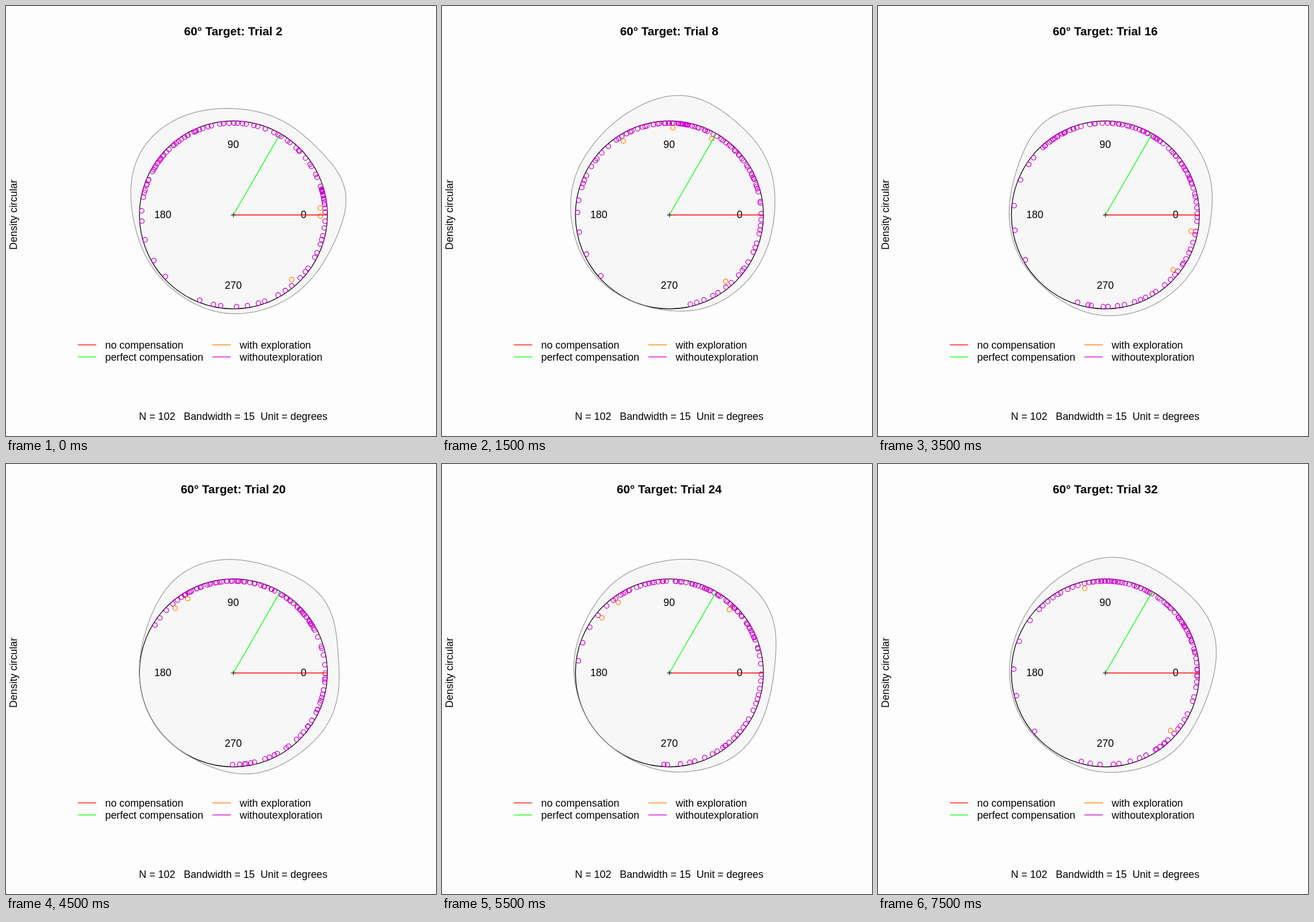
These frames come from a looping animation (748x748 px, 8 s). An HTML page:

```html
<!DOCTYPE html>
<html lang="en">
<head>
<meta charset="utf-8">
<title>Circular density by trial</title>
<style>
  html, body { margin: 0; width: 100%; height: 100%; overflow: hidden; background: #fdfdfd; }
  svg { display: block; width: 100vw; height: 100vh; }
  text { font: 17.85px "Liberation Sans", Arial, sans-serif; fill: #000; white-space: pre; }
  .mid { text-anchor: middle; }
  #title { font-size: 20.7px; font-weight: bold; }
  path, circle { fill: none; stroke-width: 1.3; }
  #area { fill: #f7f7f7; }
  #edge { stroke: #a0a0a0; }
  .rim { stroke: #000; }
  .none { stroke: #f00; }
  .perfect { stroke: #0f0; }
  .with { stroke: #ff7f00; }
  .without { stroke: #cd00cd; }
</style>
</head>
<body>
<svg viewBox="0 0 748 748">
  <text id="title" class="mid" x="395.3" y="50.5"></text>
  <path id="area"/>
  <circle class="rim" cx="395.6" cy="363.3" r="163.5"/>
  <path id="edge"/>
  <text class="mid" x="395.3" y="246.7">90</text>
  <text class="mid" x="272.8" y="369.3">180</text>
  <text class="mid" x="395.3" y="491.8">270</text>
  <text class="mid" x="517.8" y="369.3">0</text>
  <path id="without" class="without"/>
  <path id="with" class="with"/>
  <path class="none" d="M395.5 363.5H559"/>
  <path class="perfect" d="M395.6 363.3L477.2 221.9"/>
  <path stroke="#333" d="M391.5 363.5h8M395.5 359.5v8"/>

  <path class="none" d="M125 589.5h32"/>
  <path class="perfect" d="M125 610.5h32"/>
  <path class="with" d="M359 589.5h32"/>
  <path class="without" d="M359 610.5h32"/>
  <text x="172.5" y="595.7">no compensation</text>
  <text x="172.5" y="617">perfect compensation</text>
  <text x="406.5" y="595.7">with exploration</text>
  <text x="406.5" y="617">withoutexploration</text>

  <text class="mid" x="395.3" y="720.3">N = 102   Bandwidth = 15  Unit = degrees</text>
  <text class="mid" transform="translate(19 363) rotate(-90)">Density circular</text>
</svg>
<script>
const CX = 395.6, CY = 363.3, R = 163.5, RAD = Math.PI / 180;
const N = 102, KAPPA = 15, SCALE = 0.67;
const STEP = 500, STEPS = 16;

// Key trials: evenly ranked quantiles of the angles in degrees,
// and the few angles reached with exploration.
const keys = {
  2: { many: [-111, -60, -21, 6, 14, 16.5, 44, 64, 86, 109, 122, 137.5, 147.5, 164.5, 224], few: [4.5, -0.8, -48] },
  8: { many: [-78, -41, -12, 15.5, 28, 42, 54.5, 70, 79, 84, 94, 108.5, 125, 158, 220], few: [122, 87.7, 61, -49.8] },
  12: { many: [-103, -57.5, -30, 7, 16, 31, 48, 62, 73.5, 91, 102, 113.5, 119.5, 130, 186], few: [128.3, 121, 65.5] },
  16: { many: [-107, -72, -40.5, -14, 13, 24.5, 37.5, 53, 60, 73, 89.5, 110.5, 121, 132.5, 211], few: [-10.7, -39.1] },
  20: { many: [-91, -68, -38, -21.5, -3, 27, 35.5, 43, 55.5, 70, 86, 97.5, 110.5, 123, 148], few: [132, 121.6] },
  24: { many: [-95, -55.5, -43, -14, 17.5, 28.5, 35, 45, 57.5, 66.5, 76, 88.5, 106, 122.5, 173.5], few: [126, 140.8, 46.5] },
  32: { many: [-105, -61, -41.5, -7.5, 10.5, 21.5, 30, 41.5, 57.5, 69.5, 83, 90.5, 101.5, 128.5, 220], few: [103.8, -41.5] }
};

function random(seed) {
  return () => {
    seed = (seed * 1664525 + 1013904223) >>> 0;
    return seed / 4294967296;
  };
}

const lerp = (a, b, t) => a + (b - a) * t;

// Linear between quantiles; the last stretch thins out towards its end.
function quantile(list, q) {
  const last = list.length - 2, p = q * (last + 1);
  const i = Math.min(Math.floor(p), last), t = p - i;
  return lerp(list[i], list[i + 1], i === last ? t * t : t);
}

// Trials between two key trials blend their quantiles.
function blend(n, rnd) {
  if (keys[n]) return keys[n];
  const ns = Object.keys(keys).map(Number);
  const lo = ns.filter(k => k < n).pop(), hi = ns.find(k => k > n);
  const a = keys[lo], b = keys[hi], t = (n - lo) / (hi - lo);
  return {
    many: a.many.map((v, i) => lerp(v, b.many[i], t)),
    few: (t < 0.5 ? a : b).few.map(v => v + (rnd() - 0.5) * 16)
  };
}

const at = (deg, r) => [CX + r * Math.cos(deg * RAD), CY - r * Math.sin(deg * RAD)];

const rings = (angles, r) => angles.map(a => {
  const [x, y] = at(a, r);
  return `M${(x - 4).toFixed(2)} ${y.toFixed(2)}a4 4 0 1 0 8 0a4 4 0 1 0 -8 0`;
}).join("");

// Von Mises kernel density, drawn outwards from the rim.
function outline(angles) {
  const peak = Math.sqrt(KAPPA / (2 * Math.PI)) / N;
  let d = "";
  for (let deg = 0; deg < 360; deg += 2) {
    let sum = 0;
    for (const a of angles) sum += Math.exp(KAPPA * (Math.cos((deg - a) * RAD) - 1));
    const [x, y] = at(deg, R * (1 + SCALE * peak * sum));
    d += `${d ? "L" : "M"}${x.toFixed(2)} ${y.toFixed(2)}`;
  }
  return d + "Z";
}

const scenes = Array.from({ length: STEPS }, (_, i) => {
  const n = 2 * i + 2, rnd = random(n * 7919);
  const { many, few } = blend(n, rnd);
  const angles = Array.from({ length: N }, (_, k) => quantile(many, k / (N - 1)));
  const edge = outline(angles);
  return {
    title: `60° Target: Trial ${n}`,
    paths: {
      area: edge,
      edge,
      without: rings(angles.map(a => a + (rnd() - 0.5) * 4), 159.6),
      with: rings(few, 151.5)
    }
  };
});

const $ = id => document.getElementById(id);
let shown = -1;

function draw(time) {
  const i = Math.floor(time / STEP) % STEPS;
  if (i === shown) return;
  shown = i;
  $("title").textContent = scenes[i].title;
  for (const [id, d] of Object.entries(scenes[i].paths)) $(id).setAttribute("d", d);
}

const start = performance.now();
function tick() {
  draw(performance.now() - start);
  requestAnimationFrame(tick);
}
tick();
</script>
</body>
</html>
```
